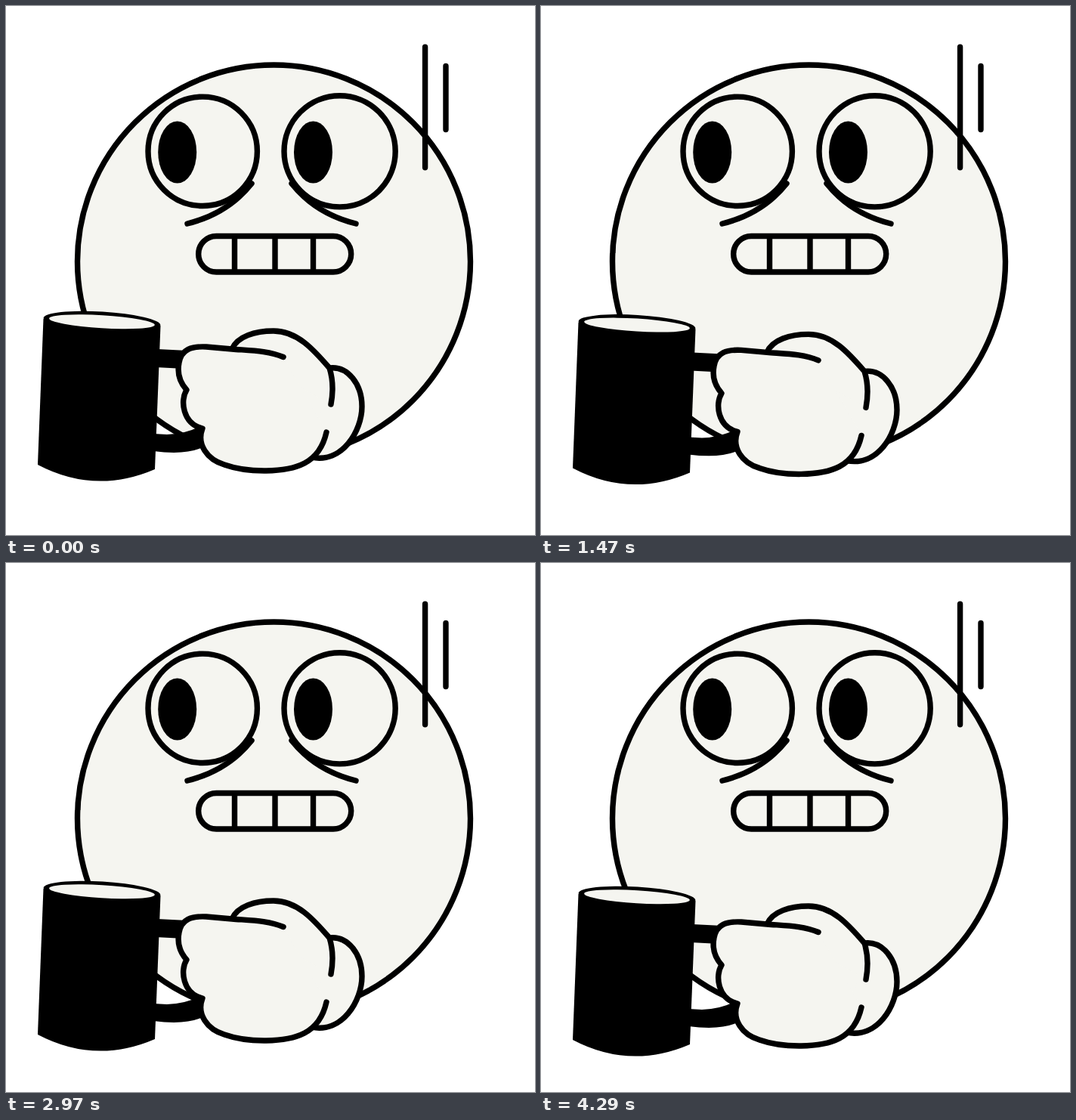
An HTML page that plays this animation: 700 by 700 pixels, repeating every 4.32 s.

```html
<!DOCTYPE html>
<html lang="en">
<head>
<meta charset="utf-8">
<title>Shaky coffee</title>
<style>
  html, body { margin: 0; width: 100%; height: 100%; overflow: hidden; background: #fff; }
  svg { display: block; width: 100%; height: 100%; }
  .ink { fill: none; stroke: #000; stroke-width: 7.4; stroke-linecap: round; stroke-linejoin: round; }
  .cream { fill: #f5f5f0; }
</style>
</head>
<body>
<svg viewBox="0 0 700 700">
  <g class="ink">
    <circle class="cream" cx="354.5" cy="338" r="260"/>
    <circle cx="260.2" cy="192.3" r="72.2"/>
    <circle cx="441.6" cy="192.3" r="73.6"/>
    <path d="M325 235Q293 275 240 288M378 235Q410 275 463 288"/>
    <rect x="254.7" y="304.5" width="202" height="47.5" rx="23.7"/>
    <path d="M302.5 305V351M356 305V351M406.5 305V351"/>
    <path id="dread"/>
  </g>
  <ellipse cx="226.7" cy="193.5" rx="25.5" ry="41"/>
  <ellipse cx="406.5" cy="193.5" rx="25.5" ry="41"/>

  <g id="arm">
    <path d="M200 454L240 456 236 480 198 478ZM195 566L213 567Q242 566 262 553L264 582Q242 595 195 589Z"/>
    <path d="M49.5 414L42 607Q118 647 197 613L204.5 423Z"/>
    <g transform="rotate(3.5 127 417.5)">
      <ellipse cx="127" cy="417.5" rx="77.5" ry="13"/>
      <ellipse class="cream" cx="127" cy="417.7" rx="70" ry="8.5"/>
    </g>
    <path class="cream" d="M299 454L428 479 430 527 424 564 404 597 300 560Z"/>
    <g class="ink">
      <path class="cream" d="M428 479C452 476 471 500 471 530C471 562 445 606 404 597"/>
      <path class="cream" d="M299 454C306 437 330 430 354 430C386 430 408 456 428 479C433 495 433 511 430 527"/>
      <path class="cream" d="M367 464.5C347 456 325 456 299 454L265 451C246 450 232 454 229 472C226 487 231 499 239 508C230 522 234 553 260 559C252 580 266 600 289 607C320 618 370 618 395 605C410 597 420 582 424 564"/>
    </g>
  </g>
</svg>
<script>
const LOOP = 4320, CYCLE = 1440, STEP = 30;
const arm = document.getElementById('arm');
const dread = document.getElementById('dread');

// time, x, y, tilt
const poses = [
  [0, 0, 0, 0], [90, 0, 17, 0], [135, 8, 24, 0], [210, 24, -8, 0],
  [285, 30, 12, 0], [420, 5, 22, 0], [540, 0, 5, 23], [660, 50, -30, 23],
  [750, 85, -55, 24], [840, 80, -47, 23.2], [900, 0, 11, 23], [930, 0, 10, 8],
  [1080, 0, -7, 0], [1200, 0, 32, 0], [1290, 0, -8, 0], [1410, 0, 24, 0],
  [1440, 0, 0, 0]
];

function poseAt(t) {
  const i = poses.findIndex(p => p[0] > t);
  const a = poses[i - 1], b = poses[i];
  const k = (t - a[0]) / (b[0] - a[0]);
  const eased = k * k * (3 - 2 * k);
  return a.map((v, n) => v + (b[n] - v) * eased);
}

// Dread lines shrink toward their middles during the sip
function lineScale(t) {
  const d = Math.min(1, Math.abs(t - 750) / 330);
  return 0.69 + 0.31 * (1 - Math.cos(Math.PI * d)) / 2;
}

const stroke = (x, mid, half) => `M${x} ${mid - half}V${mid + half}`;

function draw(ms) {
  let t = Math.floor((ms % LOOP) / STEP) * STEP;
  if (t < 60) t = 0;
  t %= CYCLE;
  const [, x, y, tilt] = poseAt(t);
  arm.setAttribute('transform', `translate(${x} ${y}) rotate(${tilt} 257 517)`);
  const s = lineScale(t);
  dread.setAttribute('d', stroke(554.6, 134, 79.7 * s) + stroke(582, 121.5, 42 * s));
}

const start = performance.now();
function tick() {
  draw(performance.now() - start);
  requestAnimationFrame(tick);
}
tick();
</script>
</body>
</html>
```
